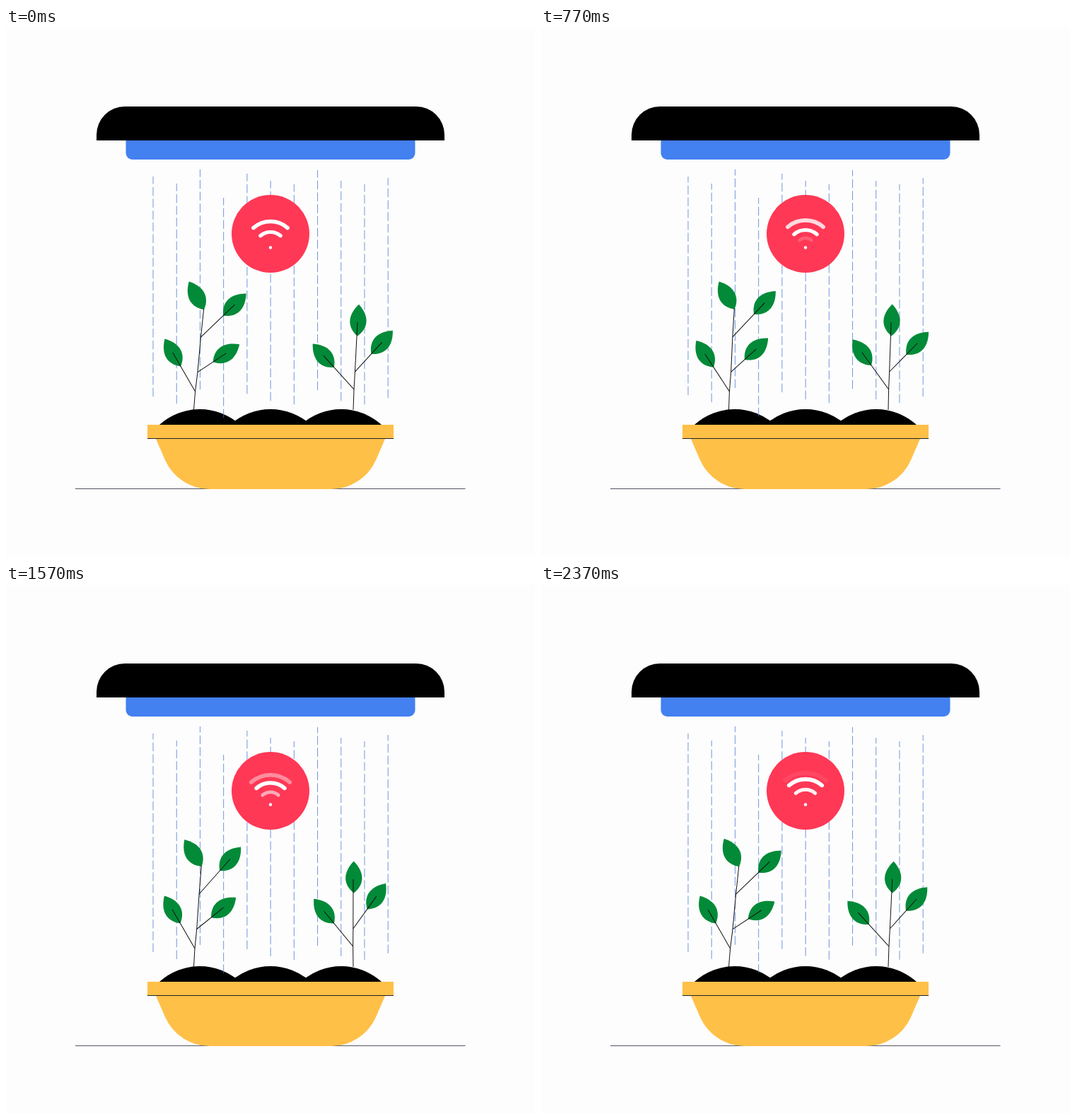
An HTML page for the animation above (2410 ms loop, 748 by 748 pixels).

```html
<!DOCTYPE html>
<html lang="en">
<head>
<meta charset="utf-8">
<title>Smart planter</title>
<style>
  html, body { margin: 0; width: 100%; height: 100%; overflow: hidden; background: #fdfdfd; }
  svg { display: block; width: 100vw; height: 100vh; }
  .ray { stroke: #4575d2; stroke-opacity: .75; stroke-dasharray: 12.5 4.2; }
  .stem { fill: none; stroke: #111; }
  .leaf { fill: #028a38; }
  .wave { fill: none; stroke: #fff; stroke-linecap: round; }
</style>
</head>
<body>
<svg viewBox="0 0 748 748">
  <path d="M128 159v-8a40 40 0 0 1 40-40h412a40 40 0 0 1 40 40v8z"/>
  <path d="M169.5 159h409v18a9 9 0 0 1-9 9h-391a9 9 0 0 1-9-9z" fill="#4380f0"/>
  <g id="soil"></g>
  <g id="rays"></g>
  <g id="plants"></g>
  <path d="M98 651.5h551.5" stroke="#555566"/>
  <path d="M212 581l13 30a69 69 0 0 0 63 41h172a69 69 0 0 0 63-41l13-30z" fill="#ffc048"/>
  <path d="M200 561h348v20h-348z" fill="#ffc048"/>
  <path d="M200 580.5h348" stroke="#222"/>
  <circle cx="374" cy="291" r="55" fill="#ff3856"/>
  <circle cx="374" cy="310.5" r="2.2" fill="#fff"/>
  <g id="waves"></g>
</svg>
<script>
const LOOP = 2410, DASH = 16.7, LEAF = 45;
const byId = id => document.getElementById(id);
const lerp = (a, b, k) => a + (b - a) * k;

function add(parent, tag, attrs = {}) {
  const el = document.createElementNS('http://www.w3.org/2000/svg', tag);
  for (const key in attrs) el.setAttribute(key, attrs[key]);
  return parent.appendChild(el);
}

add(byId('soil'), 'path', { d: 'M217 561' + 'a85 85 0 0 1 114 0m-14 0'.repeat(3) });

// Light rays hang at staggered heights; their dashes flow down
const rays = [210, 220, 200, 240, 206, 216, 221, 201, 216, 221, 212].map((top, i) =>
  add(byId('rays'), 'path', { class: 'ray', d: `M${208 + i * 33.22} ${top}v313` }));

// Every plant part sways around its root; peak is the time of its furthest clockwise pose
const parts = [];
function sway(parent, x, y, angle, amp, peak) {
  const el = add(parent, 'g');
  parts.push({ el, x, y, angle, amp, peak });
  return el;
}

function plant(x, y, amp, peak, points) {
  const el = sway(byId('plants'), x, y, 0, amp, peak);
  add(el, 'path', { class: 'stem', d: `M${x} ${y}L${points}` });
  return el;
}

// A twig of the given length that ends in a leaf, its vein reaching the middle of the leaf
function twig(parent, x, y, length, angle, amp, peak) {
  const el = sway(parent, x, y, angle, amp, peak);
  add(el, 'path', {
    class: 'leaf', d: 'M0 0C-15.5-12-15.5-29 0-45C15.5-29 15.5-12 0 0',
    transform: `translate(0 ${-length})`
  });
  if (length) add(el, 'path', { class: 'stem', d: `M0 0V${-length - LEAF / 2}` });
}

const left = plant(265.5, 540, 1.5, 2190, '267 514 269.8 486.5 273.2 437 276.5 397');
twig(left, 276.8, 398, 0, -30, 2.8, 500);
twig(left, 273.2, 437, 44, 43.6, 2, 340);
twig(left, 269.8, 486.5, 26, 51.9, 3.7, 2230);
twig(left, 267, 514, 41, -31, 1.1, 1700);

const right = plant(491, 540, 1.6, 260, '491.4 511 492.3 486 494.3 416');
twig(right, 494.7, 435.5, 0, 1.3, 0, 0);
twig(right, 492.3, 486, 34, 40.8, 4, 560);
twig(right, 491.4, 511, 42, -39.2, 4.4, 1080);
for (const plantEl of [left, right]) plantEl.append(plantEl.querySelector('.stem'));

// Signal waves step outward from ring to ring, fading in first and out last
const RINGS = [11, 21.5, 36.5, 45];
const waves = [0, 1, 2].map(() => add(byId('waves'), 'path', { class: 'wave' }));
function drawWave(el, ring, u) {
  const ease = lerp(u, u * u * (3 - 2 * u), .5);
  const r = lerp(RINGS[ring], RINGS[ring + 1], ease);
  const dx = r * Math.sin(.72), y = 310 - r * Math.cos(.72);
  el.setAttribute('d', `M${374 - dx} ${y}A${r} ${r} 0 0 1 ${374 + dx} ${y}`);
  el.setAttribute('stroke-width', Math.min(5.6, 4.2 + ring + ease));
  el.setAttribute('opacity', [ease, 1, 1 - ease][ring]);
}

function draw(now) {
  const time = now % LOOP, p = time / LOOP;
  for (const ray of rays) ray.setAttribute('stroke-dashoffset', 1.9 - p * 9 * DASH);
  for (const { el, x, y, angle, amp, peak } of parts) {
    const turn = angle + amp * Math.cos((time - peak) / LOOP * Math.PI * 2);
    const pivot = angle || el.parentNode.id !== 'plants' ? `translate(${x} ${y}) rotate(${turn})` : `rotate(${turn} ${x} ${y})`;
    el.setAttribute('transform', pivot);
  }
  waves.forEach((el, ring) => drawWave(el, ring, p * 7 % 1));
  requestAnimationFrame(draw);
}
draw(0);
</script>
</body>
</html>
```
